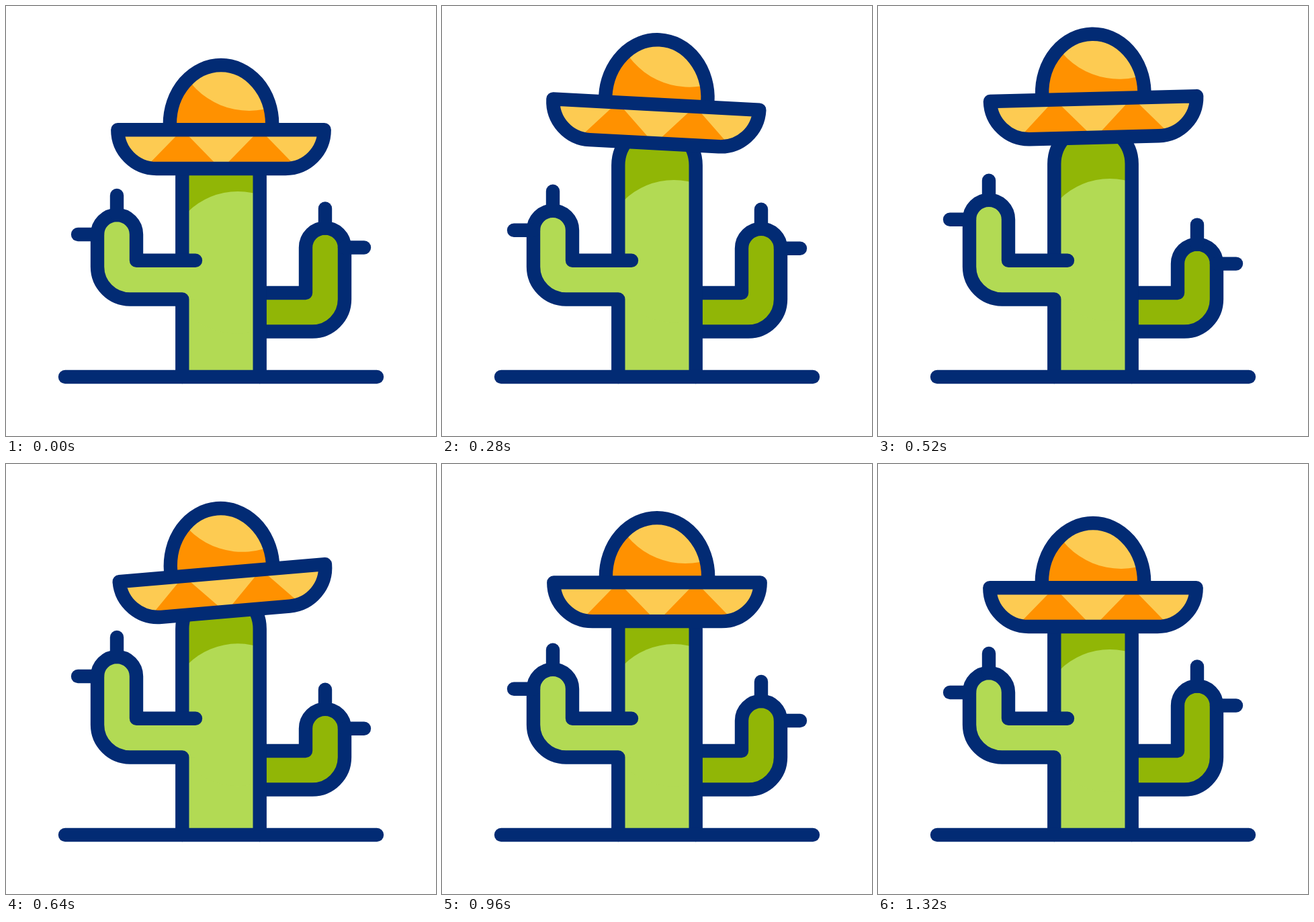
Recreate the animation shown at these times as an HTML page with a canvas. Size 640x640 px, loop 1.36 s.

```html
<!DOCTYPE html>
<html lang="en">
<head>
<meta charset="utf-8">
<title>Dancing cactus</title>
<style>
  html, body { margin: 0; width: 100%; height: 100%; overflow: hidden; background: #fff; }
  canvas { display: block; width: 640px; height: 640px; }
</style>
</head>
<body>
<canvas id="stage" width="640" height="640"></canvas>
<script>
const ctx = document.getElementById('stage').getContext('2d');
const NAVY = '#022b74', LIGHT = '#b2da54', GREEN = '#91b606', YELLOW = '#fdcb52', ORANGE = '#ff9100';
const LOOP = 1360, STEP = 40;

// Keys are [time in ms, value]; every segment eases in and out.
const TRACKS = {
  body: [[80, 0], [400, -25], [730, -5], [940, -8], [1240, 0]],
  jump: [[120, 0], [400, -34], [820, 0]],
  tilt: [[160, 0], [370, 5], [620, -5], [650, -4.8], [800, 0]],
  left: [[120, 0], [600, -24], [680, -24], [1080, 0]],
  right: [[225, 0], [705, 36], [790, 36], [1200, 0]]
};

function valueAt(keys, t) {
  if (t <= keys[0][0]) return keys[0][1];
  for (let i = 1; i < keys.length; i++) {
    const [t0, v0] = keys[i - 1], [t1, v1] = keys[i];
    if (t < t1) {
      const u = (t - t0) / (t1 - t0);
      return v0 + (v1 - v0) * u * u * (3 - 2 * u);
    }
  }
  return keys[keys.length - 1][1];
}

function fill(path, color) {
  ctx.fillStyle = color;
  ctx.fill(path);
}

function line(...points) {
  const path = new Path2D();
  points.forEach(([x, y]) => path.lineTo(x, y));
  ctx.stroke(path);
}

function disc(x, y, r, color) {
  const path = new Path2D();
  path.arc(x, y, r, 0, 2 * Math.PI);
  fill(path, color);
}

function clipped(path, draw) {
  ctx.save();
  ctx.clip(path);
  draw();
  ctx.restore();
}

function drawRightArm(dy) {
  const top = 359.5 + dy;
  const arm = new Path2D();
  arm.moveTo(377.7, 427);
  arm.lineTo(446, 427);
  arm.lineTo(446, top);
  arm.arc(475, top, 29, Math.PI, 0);
  arm.lineTo(504, 436);
  arm.arc(456, 436.5, 48, 0, Math.PI / 2);
  arm.lineTo(377.7, 484.5);
  fill(arm, GREEN);
  ctx.stroke(arm);
  line([475, top - 58], [475, top - 29]);
  line([504, top], [533, top]);
}

function drawBody(dy) {
  const top = 254 + dy;
  const shape = new Path2D();
  shape.moveTo(262.3, 552);
  shape.lineTo(262.3, top);
  shape.arc(320, top, 57.7, Math.PI, 0);
  shape.lineTo(377.7, 552);
  fill(shape, LIGHT);
  clipped(shape, () => {
    ctx.fillStyle = GREEN;
    ctx.fillRect(250, 100, 140, 218 + dy);
    disc(345, 382 + dy, 106, LIGHT);
  });
  const outline = new Path2D();
  outline.moveTo(262.3, 378.7);
  outline.lineTo(262.3, top);
  outline.arc(320, top, 57.7, Math.PI, 0);
  outline.lineTo(377.7, 552);
  ctx.stroke(outline);
}

function drawLeftArm(dy) {
  const top = 340 + dy;
  const arm = new Path2D();
  arm.moveTo(282, 378.7);
  arm.lineTo(194, 378.7);
  arm.lineTo(194, top);
  arm.arc(165, top, 29, 0, Math.PI, true);
  arm.lineTo(136, 388);
  arm.arc(184.5, 388, 48.5, Math.PI, Math.PI / 2, true);
  arm.lineTo(262.3, 436.5);
  const inside = new Path2D(arm);
  inside.lineTo(282, 436.5);
  fill(inside, LIGHT);
  arm.lineTo(262.3, 552);
  ctx.stroke(arm);
  line([165, top - 58], [165, top - 29]);
  line([107, top], [136, top]);
}

function drawHat(dy, degrees) {
  ctx.save();
  ctx.translate(320, 163 + dy);
  ctx.rotate(degrees * Math.PI / 180);
  ctx.translate(-320, -163);

  const crown = new Path2D();
  crown.moveTo(243.8, 184);
  crown.lineTo(243.8, 176);
  crown.ellipse(320, 176, 76.2, 88, 0, Math.PI, 2 * Math.PI);
  crown.lineTo(396.2, 184);
  fill(crown, ORANGE);
  clipped(crown, () => disc(362, 44, 112, YELLOW));
  ctx.stroke(crown);

  const brim = new Path2D();
  brim.moveTo(166.3, 184.3);
  brim.lineTo(473.7, 184.3);
  brim.arc(416, 184.3, 57.7, 0, Math.PI / 2);
  brim.lineTo(224, 242);
  brim.arc(224, 184.3, 57.7, Math.PI / 2, Math.PI);
  brim.closePath();
  fill(brim, YELLOW);
  for (const x of [262.5, 378]) {
    const triangle = new Path2D();
    triangle.moveTo(x, 184);
    triangle.lineTo(x + 56.5, 242);
    triangle.lineTo(x - 56.5, 242);
    fill(triangle, ORANGE);
  }
  ctx.stroke(brim);
  ctx.restore();
}

function draw(t) {
  const pose = {};
  for (const name in TRACKS) pose[name] = valueAt(TRACKS[name], t);
  ctx.fillStyle = '#fff';
  ctx.fillRect(0, 0, 640, 640);
  ctx.strokeStyle = NAVY;
  ctx.lineWidth = 20.4;
  ctx.lineCap = ctx.lineJoin = 'round';
  drawRightArm(pose.right);
  drawBody(pose.body);
  drawLeftArm(pose.left);
  line([88, 552], [552, 552]);
  drawHat(pose.body + pose.jump, pose.tilt);
}

const start = performance.now();
function tick() {
  const t = (performance.now() - start) % LOOP;
  draw(Math.floor(t / STEP) * STEP);
  requestAnimationFrame(tick);
}
tick();
</script>
</body>
</html>
```
